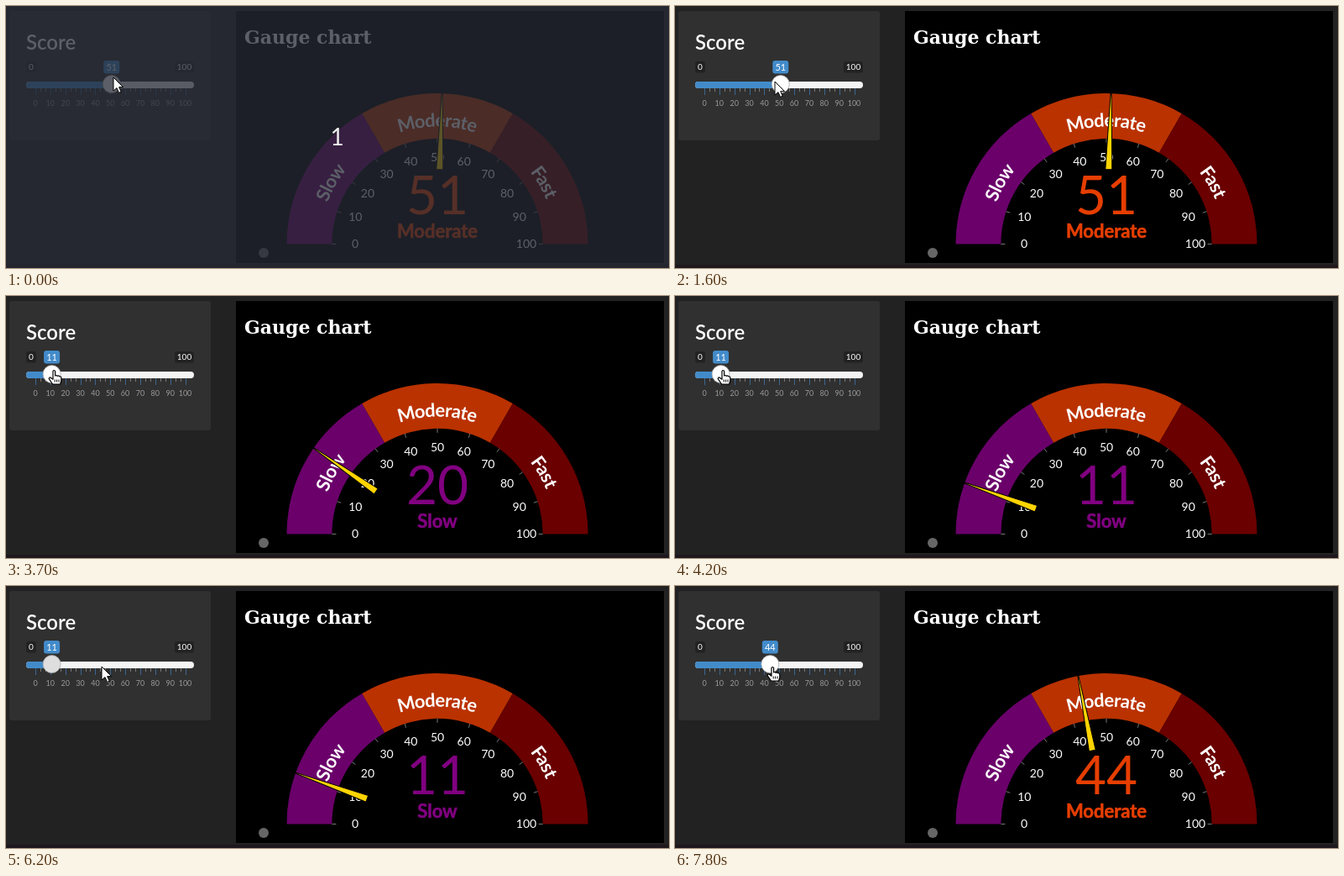
These frames come from a looping animation (790x312 px, 8000 ms). An HTML page:

```html
<!DOCTYPE html>
<html lang="en">
<head>
<meta charset="utf-8">
<title>Gauge chart</title>
<style>
  html, body { margin: 0; width: 100%; height: 100%; overflow: hidden; background: #222; }
  svg { display: block; width: 790px; height: 312px; font-family: Lato, sans-serif; }
  .mid { text-anchor: middle; }
  .band { font-size: 22px; font-weight: 700; fill: #fff; text-anchor: middle; }
</style>
</head>
<body>
<svg id="stage" viewBox="0 0 790 312">
  <rect width="790" height="312" fill="#222"/>
  <rect y="308" width="790" height="4" fill="#1e181c"/>

  <rect x="4" y="6" width="240" height="154" rx="3" fill="#303030"/>
  <text x="24" y="52" font-size="24" font-weight="600" fill="#fff">Score</text>
  <g font-size="10" fill="#fff" class="mid">
    <rect x="24" y="66" width="12" height="13.5" rx="3" fill="#222"/>
    <text x="30" y="76">0</text>
    <rect x="201" y="66" width="23" height="13.5" rx="3" fill="#222"/>
    <text x="212.5" y="76">100</text>
  </g>
  <g id="grid" font-size="9" fill="#999"></g>
  <rect x="24" y="90" width="200" height="8" rx="4" fill="#f4f4f4"/>
  <rect id="bar" x="24" y="90" height="8" rx="4" fill="#428bca"/>
  <g id="thumb">
    <rect x="-9.5" y="65" width="19" height="15.5" rx="3" fill="#428bca"/>
    <text id="score" class="mid" y="76.5" font-size="11" fill="#fff"></text>
    <circle id="handle" cy="93" r="10.5" stroke="#ababab" stroke-width=".8"/>
  </g>

  <rect x="274" y="6" width="510" height="300" fill="#000"/>
  <text x="284" y="45" font-size="22" font-weight="700" fill="#fff" font-family="DejaVu Serif, serif">Gauge chart</text>
  <path id="arc" d="M366 283.5A148 148 0 0 1 662 283.5" fill="none"/>
  <g id="gauge"></g>
  <text id="value" class="mid" x="514" y="247.5" font-size="64"></text>
  <text id="level" class="mid" x="514" y="276" font-size="22" font-weight="700" stroke-width=".6"></text>
  <path id="needle" d="M335 283L425 279.5V287.5L335 284Z" fill="#ffd400" stroke="#000"/>
  <circle cx="307" cy="294" r="6" fill="#666"/>

  <g id="overlay">
    <rect width="790" height="312" fill="#262a34" opacity=".75"/>
    <text class="mid" x="394.5" y="166" font-size="28" fill="#eee">1</text>
  </g>

  <g id="cursor" stroke-linejoin="round">
    <path id="arrow" d="M0 0V16L4 12.6L6.6 18.4L9.2 17.2L6.7 11.6H11.6Z" fill="#fff" stroke="#000"/>
    <g id="hand">
      <path d="M1 1.5Q2.2-.5 3.6 1.5V7Q5 5.8 6.2 7.4Q7.6 6.2 8.8 7.9Q10.6 7.3 10.8 9.5V13L9.6 17H.6L-3.8 10.6Q-3.4 8 -1.4 9.4L1 11.2Z" fill="#fff" stroke="#000" stroke-width="1.2"/>
      <path d="M3.2 11.5V14.5M5.6 11.5V14.5M8 11.5V14.5" stroke="#000" fill="none"/>
    </g>
  </g>
</svg>
<script>
const LOOP = 8000, STEP = 100;
const CX = 514, CY = 283.5, OUTER = 179.5, INNER = OUTER * .7;
const NS = 'http://www.w3.org/2000/svg';
const $ = id => document.getElementById(id);

function add(parent, tag, attrs, text) {
  const node = document.createElementNS(NS, tag);
  for (const key in attrs) node.setAttribute(key, attrs[key]);
  if (text !== undefined) node.textContent = text;
  parent.appendChild(node);
  return node;
}

function polar(percent, radius) {
  const a = Math.PI * percent / 100;
  return [CX - radius * Math.cos(a), CY - radius * Math.sin(a)];
}

function buildGrid() {
  for (let i = 0; i <= 30; i++) {
    const x = 35 + i * 5.95, major = i % 3 === 0;
    add($('grid'), 'rect', {
      x: Math.round(x), y: 98, width: 1, height: major ? 8 : 4, fill: major ? '#3b6690' : '#777'
    });
    if (major) add($('grid'), 'text', { class: 'mid', x, y: 118.5 }, i / 3 * 10);
  }
}

function buildGauge() {
  const gauge = $('gauge');
  [['Slow', '#6b006b'], ['Moderate', '#ba3200'], ['Fast', '#6a0000']].forEach(([name, fill], i) => {
    const from = i * 100 / 3, to = from + 100 / 3;
    add(gauge, 'path', {
      fill,
      d: `M${polar(from, OUTER)}A${OUTER} ${OUTER} 0 0 1 ${polar(to, OUTER)}` +
         `L${polar(to, INNER)}A${INNER} ${INNER} 0 0 0 ${polar(from, INNER)}Z`
    });
    // The path runs through the middle of the letters, so they are lowered onto it.
    const label = add(gauge, 'text', { class: 'band' });
    const path = add(label, 'textPath', { href: '#arc', startOffset: (from + to) / 2 + '%' });
    add(path, 'tspan', { dy: 8 }, name);
  });
  for (let v = 0; v <= 100; v += 10) {
    add(gauge, 'path', { d: `M${polar(v, INNER)}L${polar(v, INNER - 5)}`, stroke: '#777' });
    const radius = v === 0 ? 98 : v === 100 ? 106 : 102.7;
    const [x, y] = polar(v, radius);
    add(gauge, 'text', { class: 'mid', x, y: y + 4.5, 'font-size': 14, fill: '#fff' }, v);
  }
}

// Pointer path: time, x, y
const PATH = [
  [0, 128, 85], [1500, 128, 85], [1600, 119, 90], [1700, 96, 90], [1800, 70, 89],
  [1900, 54.5, 89], [2500, 54.5, 89], [2600, 55, 88], [4400, 55, 88], [4700, 63, 89],
  [5000, 94, 90], [5300, 115, 90], [5700, 115, 97], [6000, 115, 97], [6200, 114, 96], [LOOP, 114, 96]
];

function pointer(t) {
  const i = PATH.findIndex(p => p[0] > t);
  const [t0, x0, y0] = PATH[i - 1], [t1, x1, y1] = PATH[i];
  const k = (t - t0) / (t1 - t0);
  return [x0 + (x1 - x0) * k, y0 + (y1 - y0) * k];
}

function easeOut(t, start) {
  const k = Math.min(1, Math.max(0, (t - start) / 1000));
  return 1 - (1 - k) ** 3;
}

const reading = t => 51 - 40 * easeOut(t, 3293) + 33 * easeOut(t, 6840);

function render(t) {
  const score = t < 3300 ? 51 : t < 6600 ? 11 : 44;
  const x = 35 + score * 1.78;
  const [px, py] = pointer(t);
  const over = Math.abs(px - x) < 11;
  const hover = over && !(t >= 6600 && t < 6900);
  const hand = over && t >= 3300;

  $('bar').setAttribute('width', x - 24);
  $('thumb').setAttribute('transform', `translate(${x} 0)`);
  $('score').textContent = score;
  $('handle').setAttribute('fill', hover ? '#fff' : '#dedede');

  // The number trails the needle by one screen refresh.
  const shown = reading(t - 16);
  const slow = shown < 100 / 3;
  const color = slow ? '#800080' : '#e63e00';
  $('value').textContent = Math.round(shown);
  $('value').setAttribute('fill', color);
  $('level').textContent = slow ? 'Slow' : 'Moderate';
  $('level').setAttribute('fill', color);
  $('level').setAttribute('stroke', color);
  $('needle').setAttribute('transform', `rotate(${reading(t) * 1.8} ${CX} ${CY})`);

  $('overlay').setAttribute('opacity', t < 100 ? 1 : t < 200 ? .4 : 0);
  $('cursor').setAttribute('transform', `translate(${px} ${py})`);
  $('arrow').setAttribute('visibility', hand ? 'hidden' : 'visible');
  $('hand').setAttribute('visibility', hand ? 'visible' : 'hidden');
}

buildGrid();
buildGauge();
const began = performance.now();
function tick() {
  const t = (performance.now() - began) % LOOP;
  render(Math.floor(t / STEP) * STEP);
  requestAnimationFrame(tick);
}
tick();
</script>
</body>
</html>
```
